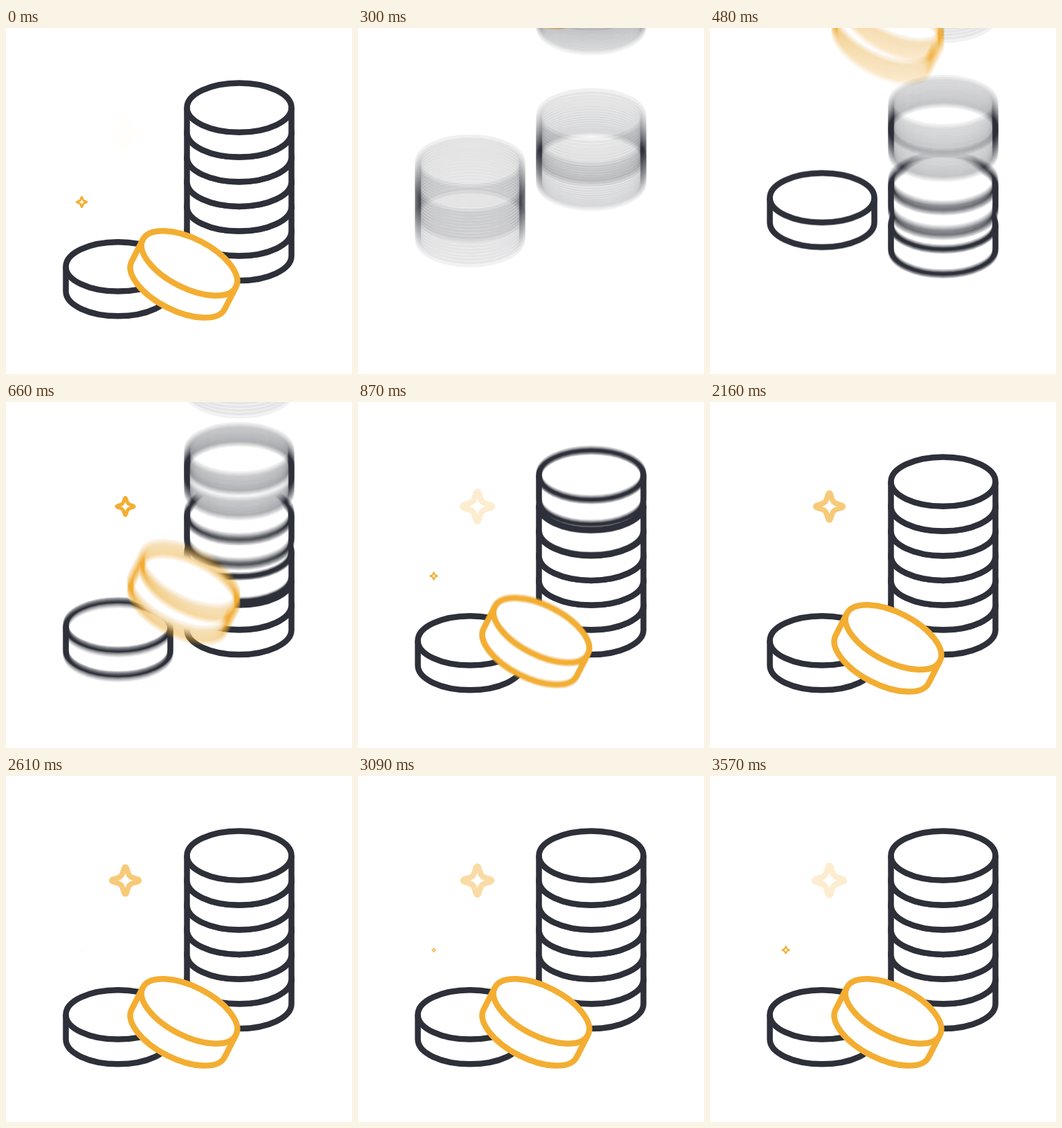
These frames come from a looping animation (500 px wide and 500 px high, 3600 ms). An HTML page with a canvas:

```html
<!DOCTYPE html>
<html lang="en">
<head>
<meta charset="utf-8">
<title>Coins</title>
<style>
  html, body { margin: 0; width: 100%; height: 100%; overflow: hidden; background: #fff; }
  canvas { display: block; width: 500px; height: 500px; }
</style>
</head>
<body>
<canvas id="stage" width="500" height="500"></canvas>
<script>
const LOOP = 3600, INTRO_START = 30, INTRO_END = 1110;
const SHUTTER = 30, SAMPLES = 18;
const DARK = '#2d3039', GOLD = '#f3ae32';
const RX = 75.5, RY = 35.7, THICK = 35.7, STROKE = 8.5;

const stage = document.getElementById('stage').getContext('2d');
const buffer = document.createElement('canvas');
buffer.width = buffer.height = 500;
const scene = buffer.getContext('2d');

// Cubic bezier easing (.65, 0, .1, 1), solved by bisection.
function ease(x) {
  if (x <= 0) return 0;
  if (x >= 1) return 1;
  let lo = 0, hi = 1, s = 0.5;
  for (let i = 0; i < 20; i++) {
    const r = 1 - s;
    if (1.95 * s * r * r + 0.3 * s * s * r + s * s * s < x) lo = s; else hi = s;
    s = (lo + hi) / 2;
  }
  return s * s * (3 - 2 * s);
}

const drop = (t, start, time, height) => -height * (1 - ease((t - start) / time));

// Free fall followed by ever smaller bounces.
function bounce(t, start, height) {
  const g = 0.01054;
  let age = t - start;
  if (age <= 0) return -height;
  const fall = Math.sqrt(2 * height / g);
  if (age < fall) return g * age * age / 2 - height;
  age -= fall;
  let speed = g * fall * 0.488;
  for (let i = 0; i < 3; i++) {
    const hop = 2 * speed / g;
    if (age < hop) return g * age * age / 2 - speed * age;
    age -= hop;
    speed *= 0.488;
  }
  return 0;
}

function coin(c, x, y, color, angle = 0) {
  c.save();
  c.translate(x, y);
  c.rotate(angle);
  c.lineWidth = STROKE;
  c.lineJoin = 'round';
  c.strokeStyle = color;
  c.fillStyle = '#fff';
  c.beginPath();
  c.ellipse(0, 0, RX, RY, 0, Math.PI, 2 * Math.PI);
  c.lineTo(RX, THICK);
  c.ellipse(0, THICK, RX, RY, 0, 0, Math.PI);
  c.closePath();
  c.fill();
  c.stroke();
  c.beginPath();
  c.ellipse(0, 0, RX, RY, 0, 0, Math.PI);
  c.stroke();
  c.restore();
}

function coins(c, t) {
  c.fillStyle = '#fff';
  c.fillRect(0, 0, 500, 500);
  for (let i = 0; i < 6; i++) {
    coin(c, 337, 293.6 - THICK * i + drop(t, 60 + 78 * i, 540, 372), DARK);
  }
  coin(c, 162, 344.9 + bounce(t, 60, 420), DARK);
  coin(c, 265, 340 + drop(t, 230, 815, 425), GOLD, 27 * Math.PI / 180);
}

// Sparkle that grows, then fades, every 450 ms.
function sparkle(c, x, y, since) {
  const age = since % 450;
  if (since < 0 || age > 424) return;
  const p = Math.min(1, age / 390);
  const size = p * (1 + 0.5 * (1 - p));
  c.save();
  c.translate(x, y);
  c.scale(size, size);
  c.globalAlpha = Math.min(1, (424 - age) / 144);
  c.strokeStyle = GOLD;
  c.lineWidth = STROKE;
  c.lineJoin = 'round';
  c.beginPath();
  c.moveTo(0, -21.5);
  for (let i = 0; i < 4; i++) {
    c.bezierCurveTo(3, -21.5, 3, -11, 7, -7);
    c.bezierCurveTo(11, -3, 21.5, -3, 21.5, 0);
    c.rotate(Math.PI / 2);
  }
  c.closePath();
  c.stroke();
  c.restore();
}

function draw(time) {
  let t = time % LOOP;
  if (t < INTRO_START) t += LOOP;
  if (t > INTRO_END) {
    coins(stage, t);
  } else {
    // Motion blur: running average over the shutter time.
    for (let k = 0; k < SAMPLES; k++) {
      coins(scene, t + SHUTTER * (k / (SAMPLES - 1) - 0.5));
      stage.globalAlpha = 1 / (k + 1);
      stage.drawImage(buffer, 0, 0);
    }
    stage.globalAlpha = 1;
  }
  sparkle(stage, 172.5, 151, t - 480);
  sparkle(stage, 109.5, 251.5, t - 805);
}

const start = performance.now();
function tick() {
  draw(performance.now() - start);
  requestAnimationFrame(tick);
}
tick();
</script>
</body>
</html>
```
